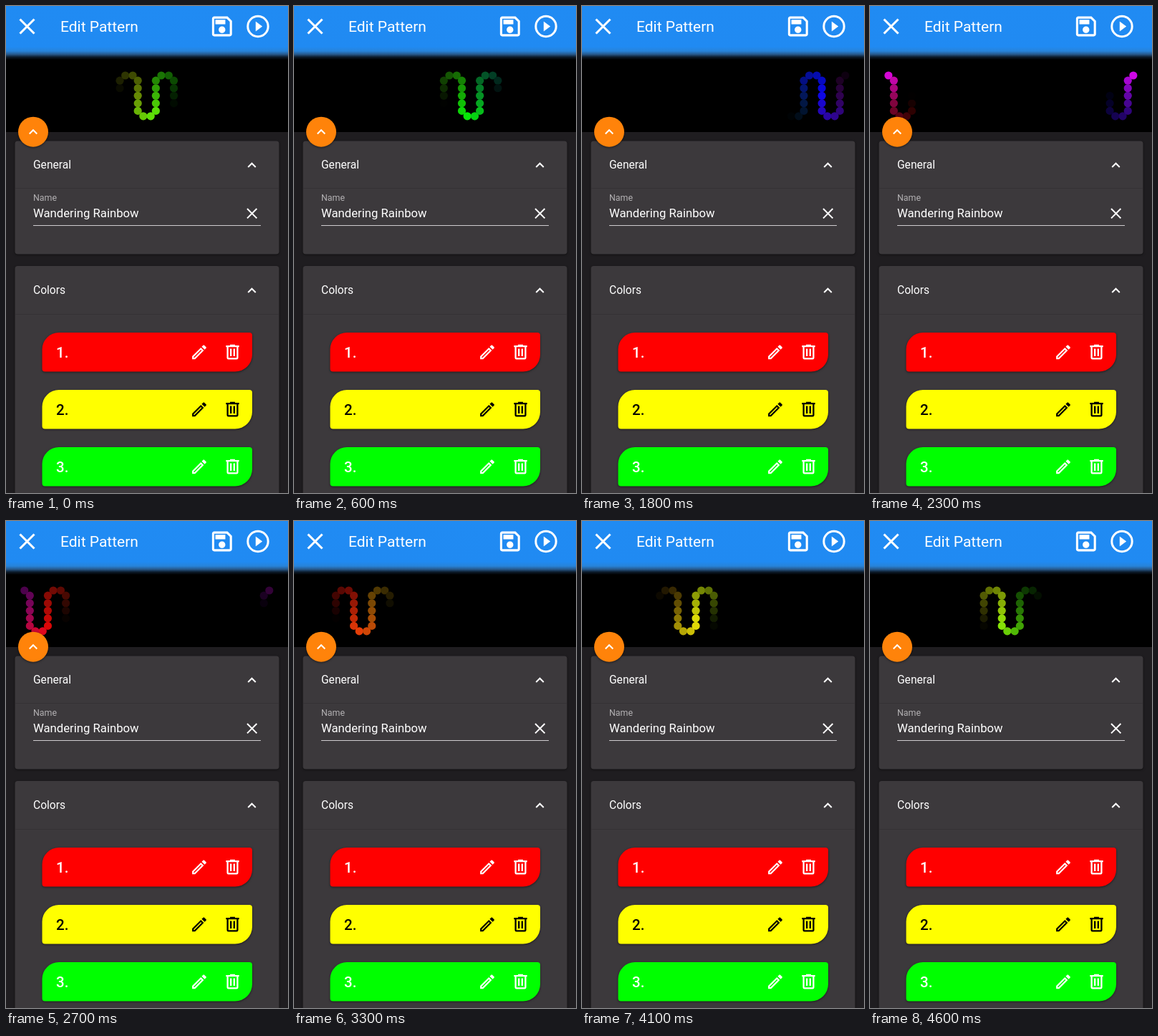
Animation, 394 px wide and 680 px high, one loop 4.7 s. Source, as an HTML page with a canvas:

```html
<!DOCTYPE html>
<html lang="en">
<head>
<meta charset="utf-8">
<title>Edit Pattern</title>
<style>
  html, body { margin: 0; width: 394px; height: 680px; overflow: hidden; background: #1f1d20; }
  svg { position: absolute; left: 0; top: 0; display: block; font-family: Roboto, sans-serif; }
  canvas { position: absolute; left: 0; top: 74px; filter: blur(.55px); }
  .shade { filter: drop-shadow(0 1px 1.5px rgba(0, 0, 0, .5)); }
</style>
</head>
<body>
<svg id="ui" width="394" height="680" viewBox="0 0 394 680">
  <defs>
    <linearGradient id="bar" x1="0" y1="0" x2="0" y2="75" gradientUnits="userSpaceOnUse">
      <stop offset="0" stop-color="#208bf3"/>
      <stop offset=".76" stop-color="#208af2"/>
      <stop offset=".84" stop-color="#2783d9"/>
      <stop offset=".9" stop-color="#27588a"/>
      <stop offset=".95" stop-color="#0c1b2b"/>
      <stop offset="1" stop-color="#000"/>
    </linearGradient>
    <path id="up" d="M7.41 15.41L12 10.83L16.59 15.41L18 14L12 8L6 14Z"/>
    <path id="pencil" d="M14.06 9L15 9.94L5.92 19H5V18.08L14.06 9M17.66 3C17.41 3 17.15 3.1 16.96 3.29L15.13 5.12L18.88 8.87L20.71 7.04C21.1 6.65 21.1 6 20.71 5.63L18.37 3.29C18.17 3.09 17.92 3 17.66 3M14.06 6.19L3 17.25V21H6.75L17.81 9.94Z"/>
    <path id="trash" d="M9 3V4H4V6H5V19A2 2 0 0 0 7 21H17A2 2 0 0 0 19 19V6H20V4H15V3H9M7 6H17V19H7V6M9 8V17H11V8H9M13 8V17H15V8H13Z"/>
  </defs>

  <rect y="70" width="394" height="106" fill="#000"/>
  <rect width="394" height="75" fill="url(#bar)"/>

  <g fill="#fff">
    <path d="M19.5 18.5L39.5 38.5M39.5 18.5L19.5 38.5" stroke="#fff" stroke-width="3.1"/>
    <text x="76" y="36" font-size="21">Edit Pattern</text>
    <path transform="translate(283.2 9.9) scale(1.55)" d="M17 3H5C3.89 3 3 3.9 3 5V19C3 20.1 3.89 21 5 21H19C20.1 21 21 20.1 21 19V7L17 3M19 19H5V5H16.17L19 7.83V19M12 12C10.34 12 9 13.34 9 15S10.34 18 12 18 15 16.66 15 15 13.66 12 12 12M6 6H15V10H6V6Z"/>
    <circle cx="352" cy="28.5" r="14.2" fill="none" stroke="#fff" stroke-width="3"/>
    <path d="M348.8 21.5V35.5L358.2 28.5Z"/>
  </g>

  <g class="shade" fill="#3c393c">
    <rect x="12.5" y="188.5" width="369" height="158" rx="4"/>
    <rect x="12.5" y="363" width="369" height="330" rx="4"/>
  </g>
  <path d="M13 254.5H381M13 430.5H381" stroke="#353235"/>

  <g fill="#fff">
    <text x="38" y="227" font-size="15.6">General</text>
    <use href="#up" x="331.5" y="210.3"/>
    <text x="38" y="272" font-size="12.4" fill="#b3b1b3">Name</text>
    <text x="38" y="295" font-size="16.7">Wandering Rainbow</text>
    <path d="M337 283L350.4 296.4M350.4 283L337 296.4" stroke="#fff" stroke-width="2"/>
    <path d="M38 306.5H356" stroke="#cfcdcf"/>
    <text x="38" y="402" font-size="15.6">Colors</text>
    <use href="#up" x="331.5" y="385.3"/>
  </g>
  <g id="rows"></g>
</svg>

<canvas id="strip" width="394" height="102"></canvas>

<svg width="394" height="240" viewBox="0 0 394 240">
  <circle class="shade" cx="38" cy="175.7" r="21" fill="#ff830a"/>
  <use href="#up" x="26" y="163.8" fill="#fff"/>
</svg>

<script>
const rows = [['#ff0000', '#fff'], ['#ffff00', '#000'], ['#00ff00', '#fff']];
document.getElementById('rows').innerHTML = rows.map(([fill, ink], i) => `
  <g transform="translate(0 ${80 * i})" fill="${ink}">
    <path class="shade" fill="${fill}" d="M74 456H340a4 4 0 0 1 4 4V486.500a24 24 0 0 1-24 24H54.500a4 4 0 0 1-4-4V479.500A23.500 23.500 0 0 1 74 456Z"/>
    <text x="70" y="490.500" font-size="20.500" font-weight="500">${i + 1}.</text>
    <use href="#pencil" transform="translate(256.800 470.100) scale(1.1)"/>
    <use href="#trash" transform="translate(302.700 469.400) scale(1.15)"/>
  </g>`).join('');

const LOOP = 4700, STEP = 100, COUNT = 98;
const START = 49.5, SPEED = 2.07, REACH = 11;

// Snake of lights: columns of five joined by pairs at the turns.
function place(i) {
  if (i === 0) return [25.8, 97];
  const col = Math.floor((i - 1) / 7), n = (i - 1) % 7;
  const x = 33.3 + 25.15 * col, down = col % 2 === 0;
  if (n < 5) return [x, 104.2 + 10.55 * (down ? n : 4 - n)];
  return [x + (n === 5 ? 7.6 : 18), down ? 153.8 : 97];
}

// Position on the strip and its hue.
const hues = [[0, 300], [5, 340], [8, 360], [14, 364], [20, 375], [27, 402],
  [36, 418], [45, 436], [49, 455], [56, 470], [62, 480], [68, 500], [73, 537],
  [77, 572], [82, 595], [87, 602], [92, 622], [98, 660]];

function hue(i) {
  const k = hues.findIndex(h => h[0] > i);
  const [a, p] = hues[k - 1], [b, q] = hues[k];
  return (p + (q - p) * (i - a) / (b - a)) % 360;
}

const lights = Array.from({ length: COUNT }, (_, i) => ({ at: place(i), hue: hue(i) }));
const ctx = document.getElementById('strip').getContext('2d');

function draw(now) {
  const step = Math.floor((now % LOOP) / STEP);
  const mid = (START + SPEED * step) % COUNT;
  ctx.clearRect(0, 0, 394, 102);
  lights.forEach(({ at: [x, y], hue }, i) => {
    const gap = Math.abs(i - mid);
    const level = 1 - Math.min(gap, COUNT - gap) / REACH;
    if (level <= 0) return;
    ctx.fillStyle = `hsl(${hue} 94% ${47 * level}%)`;
    ctx.beginPath();
    ctx.arc(x, y - 74, 5.6, 0, 2 * Math.PI);
    ctx.fill();
  });
}

const begin = performance.now();
function tick() {
  draw(performance.now() - begin);
  requestAnimationFrame(tick);
}
tick();
</script>
</body>
</html>
```
